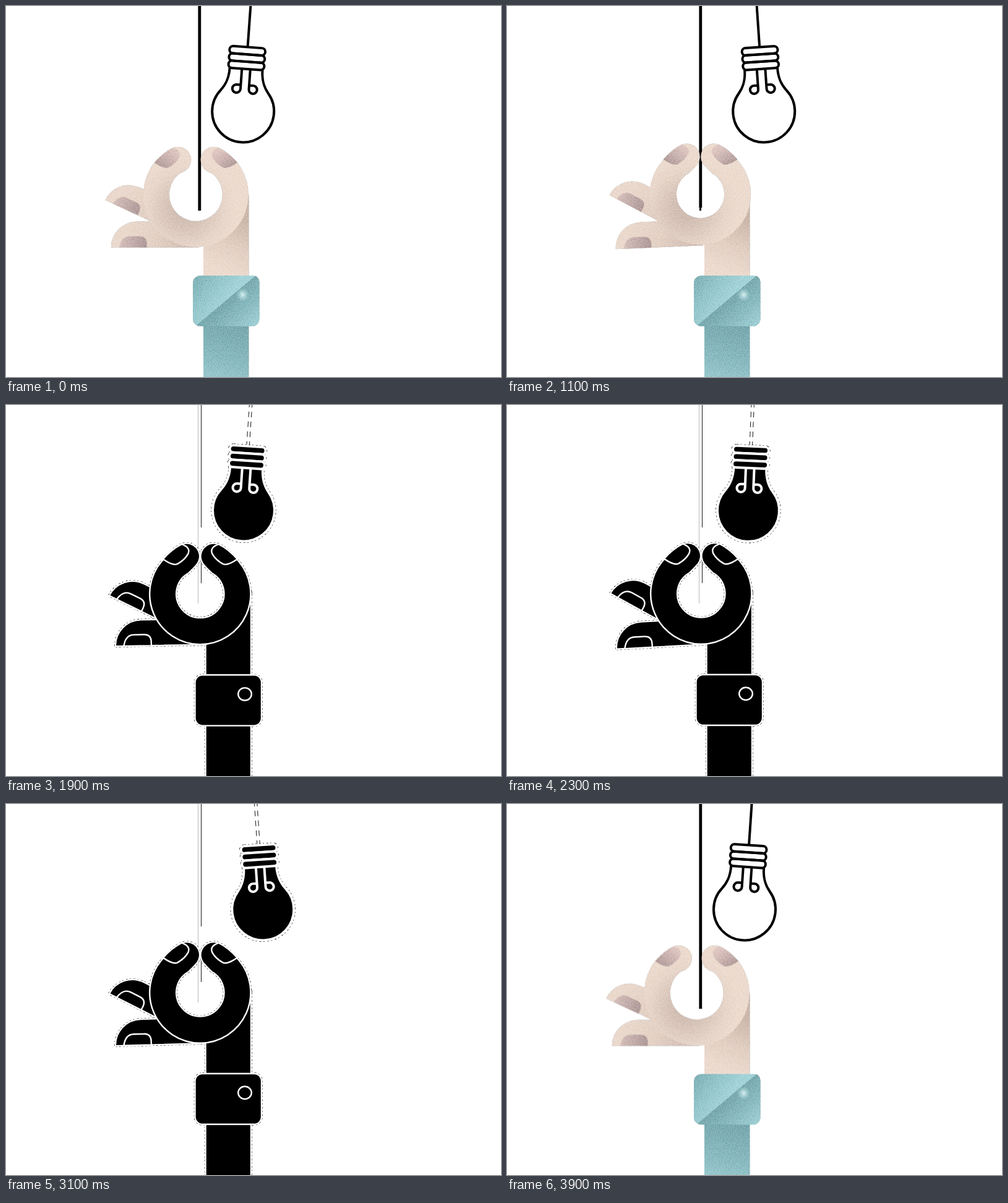
These frames come from a looping animation (800x600 px, 4 s). An HTML page:

```html
<!DOCTYPE html>
<html lang="en">
<head>
<meta charset="utf-8">
<title>Light switch</title>
<style>
html, body { margin: 0; width: 100%; height: 100%; overflow: hidden; background: #fff; }
svg { display: block; width: 800px; height: 600px; }
.ink { fill: none; stroke: #000; stroke-width: 4; stroke-linecap: butt; }
.rim, .hair { fill: none; stroke: #000; }
.rim { stroke-dasharray: 3 3 2 4; }
.hair { stroke-width: .9; }
.faint { stroke-opacity: .3; }
#bulbRim .rim { stroke-width: 5.2; }
#handRim .rim { stroke-width: 3.4; }
.dark .ink { fill: #000; stroke: #fff; }
.dark .skin { fill: #000; stroke: #fff; stroke-width: 2.4; }
.dark .lit, .night { display: none; }
.dark .night { display: inline; }
#hand { filter: url(#grain); }
.dark #hand { filter: none; }
</style>
</head>
<body>
<svg id="stage" viewBox="0 0 800 600">
  <defs>
    <filter id="grain" filterUnits="userSpaceOnUse" x="150" y="200" width="270" height="440" color-interpolation-filters="sRGB">
      <feTurbulence type="fractalNoise" baseFrequency=".85" numOctaves="2" seed="4"/>
      <feColorMatrix values="1 0 0 0 0  1 0 0 0 0  1 0 0 0 0  0 0 0 0 1" result="n"/>
      <feBlend in="n" in2="SourceGraphic" mode="soft-light"/>
      <feComposite in2="SourceGraphic" operator="in"/>
    </filter>
  </defs>
  <path id="cord" class="lit" fill="#000"/>
  <path id="cordLeft" class="night hair faint"/>
  <path id="cordRight" class="night hair"/>
  <g id="bulb">
    <path class="ink lit" d="M0 -5V67"/>
    <path class="night hair" stroke-dasharray="9 7" d="M-2.2 -5V65M2.2 -5V65"/>
    <g id="bulbRim" class="night"></g>
    <g id="bulbTop"></g>
  </g>
  <g id="move">
    <g id="handRim" class="night"></g>
    <g id="hand"></g>
  </g>
</svg>
<script>
const LOOP = 4000, STEP = 100, PIVOT = [399.6, -60];
const $ = id => document.getElementById(id);
const mix = (a, b, k) => a + (b - a) * k;
const smooth = k => k * k * (3 - 2 * k);

function add(parent, tag, attrs) {
  const el = document.createElementNS('http://www.w3.org/2000/svg', tag);
  for (const k in attrs) el.setAttribute(k, attrs[k]);
  parent.appendChild(el);
  return el;
}

// Gradients: coordinates followed by colour stops
function gradient(id, tag, coords, stops) {
  const g = add(document.querySelector('defs'), tag, { id, gradientUnits: 'userSpaceOnUse', ...coords });
  stops.forEach(([offset, color, alpha = 1]) =>
    add(g, 'stop', { offset, 'stop-color': color, 'stop-opacity': alpha }));
}
const linear = (id, x1, y1, x2, y2, ...stops) =>
  gradient(id, 'linearGradient', { x1, y1, x2, y2 }, stops);
const radial = (id, cx, cy, r, ...stops) =>
  gradient(id, 'radialGradient', { cx, cy, r }, stops);

const nailStops = [[0, '#b29d9b'], [.5, '#cbb4b1'], [1, '#e0c8c3']];
linear('gArm', 388, 345, 350, 428, [0, '#cdb9ad'], [.55, '#e3d1c5'], [1, '#eddcd0']);
radial('gRing', 291, 328, 82, [0, '#cebaaf'], [.3, '#d6c3b8'], [.75, '#e8d7cb'], [1, '#eddcd0']);
linear('gFinger', 20, -30, 140, 0, [0, '#ebdace'], [.45, '#e4d2c6'], [1, '#cfbab0']);
linear('gNailL', -28, 14, -4, -14, ...nailStops);
linear('gNailR', 26, 14, 8, -14, ...nailStops);
linear('gNailF', 14, -8, 58, -8, [0, '#d6c0bc'], [1, '#b19c9b']);
linear('gSleeve', 372, 518, 345, 625, [0, '#79abb0'], [.5, '#8abcc1'], [1, '#a2d1d6']);
linear('gCuff', 306, 440, 356, 477, [0, '#80b4b9'], [.5, '#96c8cd'], [1, '#a5d5da']);
linear('gFold', 352, 473, 398, 524, [0, '#76a8ad'], [.45, '#88babf'], [1, '#a3d3d8']);
radial('gButton', 382.5, 467, 10, [0, '#dcf1f2'], [.4, '#b5dadd', .9], [1, '#98c8cc', .35]);

// A shape with its dotted outer rim for the dark state
function shape(top, rim, tag, attrs, cls, fill) {
  const els = [add($(rim), tag, { ...attrs, class: 'rim' }),
               add($(top), tag, { ...attrs, class: cls, ...(fill && { fill }) })];
  return (k, v) => els.forEach(el => el.setAttribute(k, v));
}
const bulbPart = (tag, attrs) => shape('bulbTop', 'bulbRim', tag, attrs, 'ink');
const handPart = (tag, attrs, fill) => shape('hand', 'handRim', tag, attrs, 'skin', `url(#${fill})`);
const detail = (tag, attrs, fill, cls = 'skin') =>
  add($('hand'), tag, { ...attrs, class: cls, fill: `url(#${fill})` });

bulbPart('path', { d: 'M-26.5 102C-26.5 121 -32 131 -38.5 139.1A50 50 0 1 0 38.5 139.1C32 131 26.5 121 26.5 102' });
for (const y of [66.8, 78.6, 90.4])
  bulbPart('rect', { x: -29, y, width: 58, height: 11.8, rx: 5.9 });
for (const s of [1, -1])
  add($('bulbTop'), 'path', {
    class: 'ink', transform: `scale(${s} 1)`,
    d: 'M-6.8 103V135a6.6 6.6 0 1 1 -6.6 -6.6h6.6'
  });

const NAIL = 'M13.5 0C15 -9 19 -18 30 -18H46.5Q58 -18 58 -5.5V0Z';
const upper = handPart('path', { d: 'M0 0A42 42 0 0 1 42 -42H75L90 0Z' }, 'gFinger');
const upperNail = detail('path', { d: NAIL }, 'gNailF');
const pinky = handPart('path', { d: 'M0 0A42 42 0 0 1 42 -42H80L142 0Z' }, 'gFinger');
const pinkyNail = detail('path', { d: NAIL }, 'gNailF');

const arm = handPart('path', { d: 'M392.5 305V440H319V370L360 345Z' }, 'gArm');
const ring = handPart('path', { 'stroke-linejoin': 'round' }, 'gRing');
const TIP = s => `M${8 * s} -19.5Q${-7 * s} -14.5 ${-2.5 * s} -4Q${3 * s} 6 ${15 * s} 12.5Q${22.5 * s} 15.5 ${38 * s} 4.5Q${24 * s} -11.5 ${8 * s} -19.5Z`;
const nailR = detail('path', { d: TIP(1) }, 'gNailR');
const nailL = detail('path', { d: TIP(-1) }, 'gNailL');

const sleeve = handPart('rect', { x: 319, y: 515, width: 73.5, height: 150 }, 'gSleeve');
const cuff = handPart('rect', { x: 302, y: 436, width: 107.5, height: 82, rx: 12 }, 'gCuff');
detail('path', { d: 'M403 436.2Q409.5 439 409.5 448V506A12 12 0 0 1 397.5 518H314Q311 518 308 516.2Z' }, 'gFold', 'lit');
detail('circle', { cx: 382.5, cy: 467, r: 9.5 }, 'gButton', 'lit');
add($('hand'), 'ellipse', { class: 'night', cx: 386, cy: 467, rx: 10.8, ry: 10.2, fill: '#000', stroke: '#fff', 'stroke-width': 2.4 });

function keyed(keys, t) {
  const i = keys.findIndex(k => k[0] > t);
  const [t0, a] = keys[i - 1], [t1, b] = keys[i];
  return mix(a, b, smooth((t - t0) / (t1 - t0)));
}
const OPEN = [[0, .97], [500, .97], [1000, 0], [3450, 0], [3850, 1], [4000, .97]];
const SPREAD = [[0, 0], [600, 0], [1050, 2.8], [1200, 2.4], [1500, 0], [1700, .3], [2300, 3.4],
                [3100, 1.8], [3400, 2.7], [3850, 0], [4000, 0]];

// Quick tug down, then a decaying return
function tug(t) {
  const u = (t + 900) % 2000;
  if (u < 300) return 37 * smooth(u / 300);
  return Math.max(0, 37.6 * 2 ** ((300 - u) / 100) - .6);
}

// Ring of thumb and finger; d and capY place the round tips
function ringPath(p, cx, d, capY) {
  const cy = mix(304.4, 305, p), r = mix(81.6, 85, p), ri = mix(38.6, 43, p);
  const jx = d + 38.5, jy = cy - Math.sqrt(r * r - jx * jx);
  const ix = d - 3.4, iy = cy - Math.sqrt(ri * ri - ix * ix);
  const R = (x, y) => `${cx + x} ${y} `, L = (x, y) => R(-x, y);
  return 'M' + R(0, cy + r) + `A${r} ${r} 0 0 0 ` + R(jx, jy)
    + 'C' + R(jx - 12, jy - 13) + R(d + 13, capY - 21) + R(d, capY - 21)
    + 'A21 21 0 0 0 ' + R(d - 16, capY + 14) + 'Q' + R(d - 11, capY + 20) + R(ix, iy)
    + `A${ri} ${ri} 0 1 1 ` + L(ix, iy)
    + 'Q' + L(d - 11, capY + 20) + L(d - 16, capY + 14) + 'A21 21 0 0 0 ' + L(d, capY - 21)
    + 'C' + L(d + 13, capY - 21) + L(jx - 12, jy - 13) + L(jx, jy)
    + `A${r} ${r} 0 0 0 ` + R(0, cy + r) + 'Z';
}

const place = (el, x, y, turn = 0) => {
  const v = `translate(${x} ${y}) rotate(${turn})`;
  typeof el === 'function' ? el('transform', v) : el.setAttribute('transform', v);
};

function draw(t) {
  const dark = t >= 1400 && t < 3400;
  const p = keyed(OPEN, t), s = keyed(SPREAD, t), y = tug(t);
  $('stage').classList.toggle('dark', dark);

  const angle = 4.08 * Math.cos(2 * Math.PI * t / 2000);
  $('bulb').setAttribute('transform', `rotate(${angle} ${PIVOT}) translate(${PIVOT[0]} 0)`);

  const end = 331 + y * .54, thick = end - 5 * (1 - p);
  $('cord').setAttribute('d', `M310.4 0H315.2V${thick}H314V${end}H311V${thick}H310.4Z`);
  $('cordLeft').setAttribute('d', `M310.5 0V${end - 10}`);
  $('cordRight').setAttribute('d', `M315.5 0V${y > 5 ? 253 : 198}M315.5 253V${288 + y * .45}`);

  place($('move'), 0, y);
  const nudge = dark ? 1.3 : 0, drop = dark ? .6 : 0;
  const cx = mix(312.5, 306.7, p) + nudge, d = mix(22, 29.2, p), capY = mix(243.5, 249, p);
  ring('d', ringPath(p, cx, d, capY));
  place(ring, 0, drop);
  place(nailR, cx + d, capY + drop);
  place(nailL, cx - d, capY + drop);

  for (const el of [upper, upperNail])
    place(el, mix(165.5, 160, p) + nudge, mix(309, 314, p) - 1.2 * s, 25 + 1.1 * s);
  for (const el of [pinky, pinkyNail])
    place(el, mix(175.6, 169.5, p) + nudge, mix(387, 390.6, p) + 2.3 * s, -.9 * s);
  for (const part of [arm, sleeve, cuff]) place(part, dark ? 3.5 : 0, 0);
}

const start = performance.now();
function tick() {
  const t = (performance.now() - start) % LOOP;
  draw(Math.floor(t / STEP) * STEP);
  requestAnimationFrame(tick);
}
tick();
</script>
</body>
</html>
```
